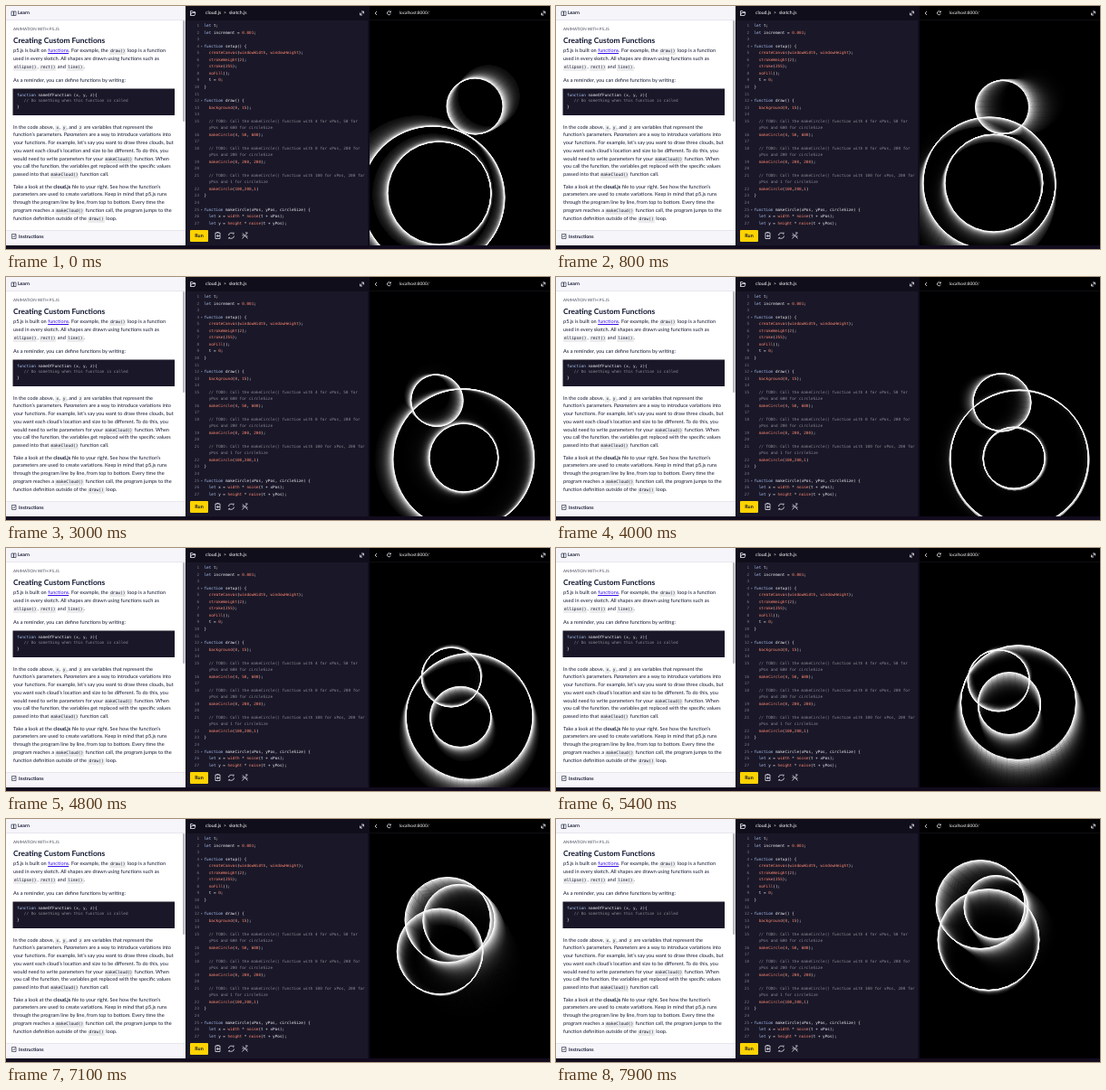
These frames come from a looping animation (600x269 px, 8000 ms). An HTML page with a canvas:

```html
<!DOCTYPE html>
<html lang="en">
<head>
<meta charset="utf-8">
<title>Creating Custom Functions</title>
<style>
html, body { margin: 0; width: 100%; height: 100%; overflow: hidden; background: #120b1e; }
#stage { position: relative; width: 600px; height: 269px; overflow: hidden; text-rendering: geometricPrecision; }
#stage > * { position: absolute; }
.row { white-space: pre; font: 5.6px/10px Lato, sans-serif; color: #10162f; }
.mono, code { font-family: "DejaVu Sans Mono", monospace; }
.mono { font-size: 4.33px; color: #f4f2fa; }
.light { color: #fff; }
code { font-size: 4.5px; background: #ececee; padding: 1px; border-radius: 1px; }
u { color: #3a10e5; }
.key { color: #b3ccff; }
.name { color: #ff8973; }
.note { color: #8d8b98; }
.num { color: #77758a; width: 13px; text-align: right; }
</style>
</head>
<body>
<div id="stage">
  <svg width="600" height="269" fill="none" stroke-width=".8">
    <path fill="#fff" d="M0 0h198v265H0z"/>
    <path fill="#f6f5fa" d="M0 0h198v16H0zM0 248h198v17H0z"/>
    <path fill="#1a1828" d="M199 0h200v265H199zM7.500 91.500h178.500v29.500H7.500z"/>
    <path fill="#100e1a" d="M199 0h200v16H199z"/>
    <path fill="#000" d="M401 0h199v265H401z"/>
    <path stroke="#e4e3ea" d="M0 15.500h198M0 248.500h198"/>
    <path stroke="#262433" d="M401 16h199"/>
    <rect x="195" y="16" width="2.5" height="112" rx="1" fill="#b9b9bd"/>
    <rect x="203" y="248" width="20" height="13" rx="1" fill="#ffd300"/>
    <g stroke="#10162f" stroke-width=".6">
      <path d="M6 6h2.500v4.500H6zM8.500 6H11v4.500H8.500z"/>
      <path d="M6.500 252.500h4.500v5h-4.500zM7.500 255l1 1 2-2.500"/>
    </g>
    <g stroke="#e8e6f0">
      <path d="M203.500 10.500v-5h2l.7 1h2.300v1M203.500 10.500l1-3h4.500l-1 3z"/>
      <path d="M231 251h5v6.500h-5zM232.500 250.500h2M236 254.500h-3M234 253l-1.500 1.500 1.500 1.500"/>
      <path d="M245.500 254a3 3 0 0 1 5.500-1.500v-2M251.500 254.500a3 3 0 0 1-5.500 1.500v2"/>
      <path d="M261 251.500l5.500 6M266 251.500l-5.500 6M260.500 254h2M264 251h2.500M264.500 255h2"/>
      <path d="M409 6l-2 2 2 2M424 6.500a2 2 0 1 0 .3 2M424.300 5.500v1.500h-1.500"/>
      <path id="expand" d="M590.500 10l4-4M592 6h2.500v2.500M590.500 7.500V10h2.500"/>
      <use href="#expand" x="-200"/>
    </g>
  </svg>
  <canvas id="sketch" width="199" height="249" style="left:401px;top:16px"></canvas>
</div>
<script>
const stage = document.getElementById('stage');

function addRow(x, y, html, cls = '', style = '') {
  stage.insertAdjacentHTML('beforeend',
    `<div class="row ${cls}" style="left:${x}px;top:${y - 5}px;${style}">${html}</div>`);
}

// Lesson
const markup = s => s.replace(/`(.+?)`/g, '<code>$1</code>')
  .replace(/_(.+?)_/g, '<u>$1</u>')
  .replace(/\*\*(.+?)\*\*/g, '<b>$1</b>')
  .replace(/\*(.+?)\*/g, '<i>$1</i>');

const paragraphs = [
  [50, 9.1, `p5.js is built on _functions_. For example, the \`draw()\` loop is a function
used in every sketch. All shapes are drawn using functions such as
\`ellipse()\`, \`rect()\` and \`line()\`.`],
  [83, 9, 'As a reminder, you can define functions by writing:'],
  [134.5, 8.75, `In the code above, \`x\`, \`y\`, and \`z\` are variables that represent the
function’s parameters. *Parameters* are a way to introduce variations into
your functions. For example, let’s say you want to draw three clouds, but
you want each cloud’s location and size to be different. To do this, you
would need to write parameters for your \`makeCloud()\` function. When
you call the function, the variables get replaced with the specific values
passed into that \`makeCloud()\` function call.`],
  [200.5, 8.85, `Take a look at the **cloud.js** file to your right. See how the function’s
parameters are used to create variations. Keep in mind that p5.js runs
through the program line by line, from top to bottom. Every time the
program reaches a \`makeCloud()\` function call, the program jumps to the
function definition outside of the \`draw()\` loop.`],
];
for (const [y, gap, text] of paragraphs)
  text.split('\n').forEach((line, i) => addRow(8, y + i * gap, markup(line)));

addRow(13, 8, 'Learn', '', 'font-size:5.2px;font-weight:bold');
addRow(8, 26, 'ANIMATION WITH P5.JS', '', 'font-size:4.5px;color:#44485a');
addRow(8, 38, 'Creating Custom Functions', '', 'font-size:8.4px;font-weight:bold');
addRow(14, 255.5, 'Instructions', '', 'font-size:5.2px;font-weight:bold');

// Code
const paint = s => s.replace(
  /(\/\/.*)|\b(let|function)\b|\b(windowWidth|windowHeight|width|height|\d[\d.]*|(?<!function )\b\w+(?=\())/g,
  (m, note, key) => `<span class="${note ? 'note' : key ? 'key' : 'name'}">${m}</span>`);

['function nameOfFunction (x, y, z){', '   // Do something when this function is called', '}']
  .forEach((line, i) => addRow(12, 99.6 + i * 6.5, paint(line), 'mono'));

// A leading ~ marks the wrapped rest of a comment
const program = `let t;
let increment = 0.001;

function setup() {
  createCanvas(windowWidth, windowHeight);
  strokeWeight(2);
  stroke(255);
  noFill();
  t = 0;
}

function draw() {
  background(0, 15);

  // TODO: Call the makeCircle() function with 4 for xPos, 50 for
~  yPos and 600 for circleSize
  makeCircle(4, 50, 600);

  // TODO: Call the makeCircle() function with 0 for xPos, 200 for
~  yPos and 200 for circleSize
  makeCircle(0, 200, 200);

  // TODO: Call the makeCircle() function with 100 for xPos, 200 for
~  yPos and 1 for circleSize
  makeCircle(100,200,1)
}

function makeCircle(xPos, yPos, circleSize) {
  let x = width * noise(t + xPos);
  let y = height * noise(t + yPos);`;

let number = 0;
program.split('\n').forEach((line, i) => {
  const y = 23.2 + i * 7.53;
  if (line[0] === '~') return addRow(218.5, y, line.slice(1), 'mono note');
  addRow(200, y, ++number, 'mono num');
  if (line.startsWith('function')) addRow(214.5, y, '▾', 'mono num', 'width:auto');
  addRow(218.5, y, paint(line), 'mono');
});

addRow(220, 8, 'cloud.js', 'light', 'font-size:5.2px');
addRow(240, 8, '&gt;', 'light', 'font-size:5.2px');
addRow(246, 8, 'sketch.js', 'light', 'font-size:5.2px');
addRow(203, 254.5, 'Run', '', 'font-size:5.4px;font-weight:bold;width:20px;text-align:center');
addRow(434, 8, 'localhost:8000/', 'light', 'font-size:4.75px');

// Circles: x, y and radius at each key time (seconds)
const times = [-0.8, 0, 0.8, 1.6, 2.1, 3.3, 4, 5.4, 6.4, 7.9, 9];
const circles = [
  [[532, 100, 34], [517, 111, 31], [492, 112, 29.5], [472, 121, 26], [465, 131, 25], [480, 138, 30],
   [492, 139, 32], [488, 147, 34], [481, 155, 40], [477, 133.5, 56], [476, 122, 62]],
  [[455, 206, 84], [471, 212, 79], [478, 196, 73], [481, 198, 74], [489, 204, 80], [509, 201, 77],
   [511, 201, 76], [510, 171, 63.5], [503, 131, 48], [468, 94.5, 49], [455, 84, 50]],
  [[471, 208, 66], [478, 207, 57], [483, 196, 54], [492, 198, 53], [499, 200, 45], [506, 200, 36],
   [505, 200, 34], [500, 172, 34.5], [509, 129, 42], [485, 97.5, 35], [474, 84, 32]],
];

// Cubic Hermite curve through the keys
function pose(keys, t) {
  let i = 0;
  while (i < times.length - 2 && t > times[i + 1]) i++;
  const span = times[i + 1] - times[i];
  const u = Math.max(0, (t - times[i]) / span);
  const slope = (k, d) => {
    const a = Math.max(0, k - 1), b = Math.min(times.length - 1, k + 1);
    return (keys[b][d] - keys[a][d]) / (times[b] - times[a]) * span;
  };
  return [0, 1, 2].map(d => {
    const a = keys[i][d], b = keys[i + 1][d], p = slope(i, d), q = slope(i + 1, d);
    return a + u * (p + u * (3 * (b - a) - 2 * p - q + u * (2 * (a - b) + p + q)));
  });
}

const ctx = document.getElementById('sketch').getContext('2d');
ctx.translate(-401, -16);
const HISTORY = 90;
const FADE = 240 / 255;

// Redraw the recent past, oldest and dimmest first, so the trail depends only on the time
function drawSketch(t) {
  ctx.fillStyle = '#000';
  ctx.fillRect(401, 16, 199, 249);
  for (let n = HISTORY; n >= 0; n--) {
    const grey = 255 * FADE ** n;
    ctx.strokeStyle = `rgb(${grey},${grey},${grey})`;
    for (const keys of circles) {
      const [x, y, r] = pose(keys, t - n / 60);
      ctx.beginPath();
      ctx.arc(x, y, r, 0, 7);
      ctx.stroke();
    }
  }
}

let shown = -1;
function tick() {
  const step = Math.floor(performance.now() % 8000 / 100);
  if (step !== shown) drawSketch((shown = step) / 10);
  requestAnimationFrame(tick);
}
tick();
</script>
</body>
</html>
```
